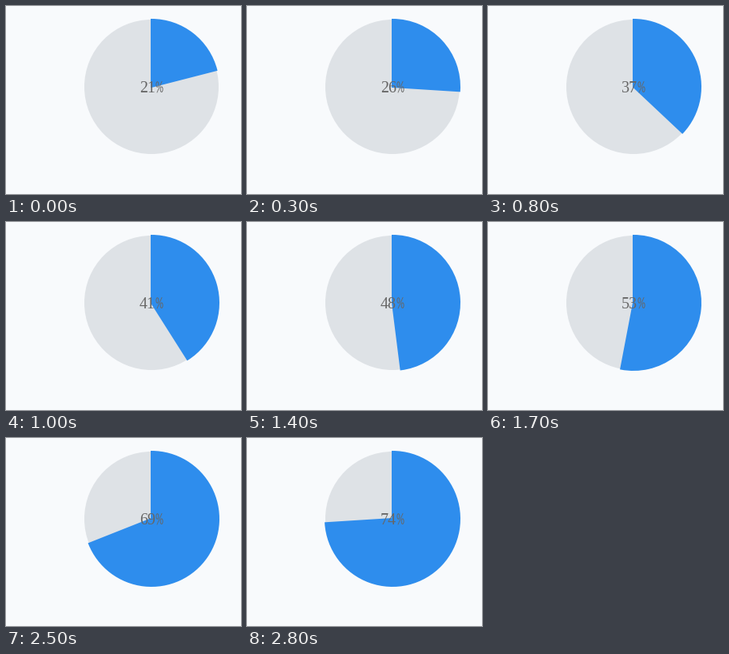
A matplotlib script for the animation above (2.9 s loop, 294 by 235 pixels).

```python
import math

import matplotlib.pyplot as plt
import numpy as np
from matplotlib.animation import FuncAnimation
from matplotlib.patches import Circle, Ellipse, Wedge

W, H, DPI = 294, 235, 64
PX = 72 / DPI  # points per pixel
CENTER, RADIUS = (182, 101), 84
BLUE, GREY, INK = "#2e8ded", "#dee2e6", "#666666"
FRAMES, STEP = 29, 100

# Uneven loading progress: (step, percent)
PROGRESS = [(0, 21), (5, 30), (6, 32), (10, 41), (12, 44), (14, 48),
            (17, 53), (18, 55), (22, 61), (24, 67), (28, 74)]


def percent_at(i):
    steps, values = zip(*PROGRESS)
    return math.floor(np.interp(i, steps, values) + 0.5)


def draw_percent_sign(ax, x, y):
    """Narrow percent sign, 10 px wide, with its baseline at y."""
    for cx, cy in ((x + 2.4, y - 10), (x + 7.6, y - 3.8)):
        ax.add_patch(Ellipse((cx, cy), 3, 6.6, fill=False, ec=INK,
                             lw=0.9 * PX, zorder=3))
    ax.plot([x + 2, x + 8], [y, y - 13.6], color=INK, lw=0.8 * PX, zorder=3)


fig = plt.figure(figsize=(W / DPI, H / DPI), dpi=DPI, facecolor="#f8fafc")
ax = fig.add_axes([0, 0, 1, 1])
ax.axis("off")

ax.add_patch(Circle(CENTER, RADIUS, fc=GREY, ec="none", zorder=1))
pie = ax.add_patch(Wedge(CENTER, RADIUS, -90, 0, fc=BLUE, ec=BLUE,
                         lw=2 * PX, zorder=2))
label = ax.text(167, 108, "", family="Liberation Serif", size=20 * PX,
                color=INK, ha="left", va="baseline", zorder=3)
draw_percent_sign(ax, 187, 108)
ax.set_xlim(0, W)
ax.set_ylim(H, 0)


def update(i):
    value = percent_at(i)
    pie.set_theta2(-90 + 3.6 * value)
    label.set_text(str(value))
    return pie, label


anim = FuncAnimation(fig, update, frames=FRAMES, interval=STEP,
                     repeat=True, repeat_delay=0)
plt.show()
```
